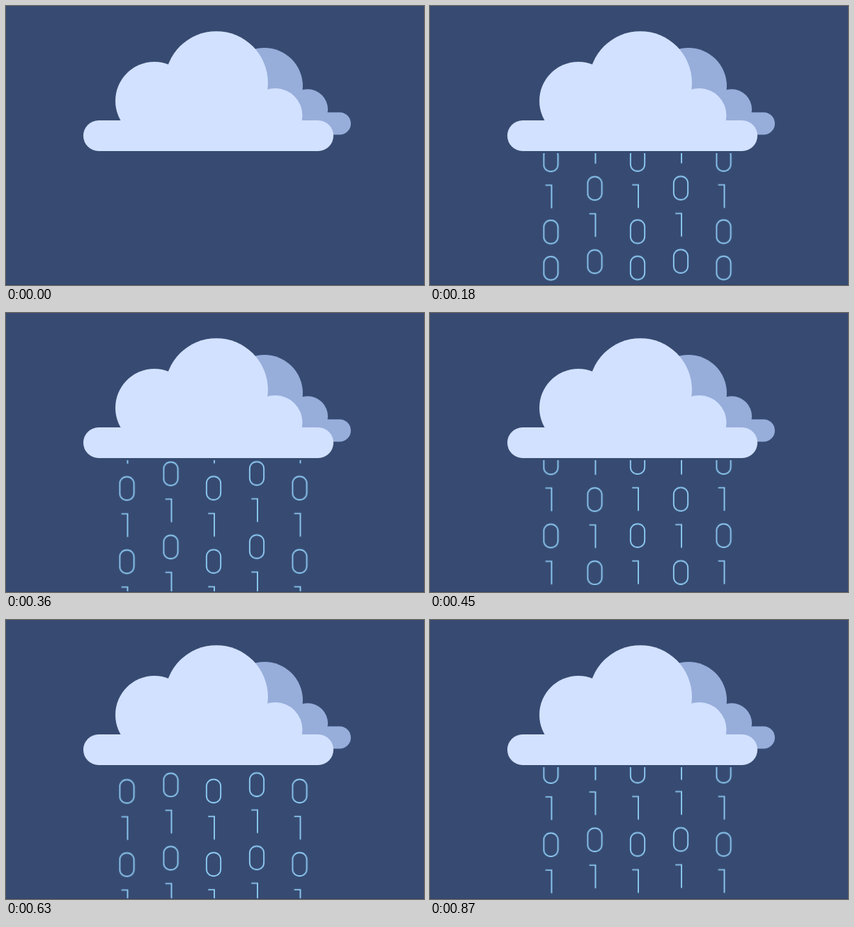
These frames come from a looping animation (600 px wide and 400 px high, 900 ms). An HTML page:

```html
<!DOCTYPE html>
<html lang="en">
<head>
<meta charset="utf-8">
<title>Data cloud</title>
<style>
  html, body { margin: 0; width: 100%; height: 100%; overflow: hidden; background: #374b72; }
  svg { display: block; }
  .back { fill: #97aedb; }
  .front { fill: #d2e1ff; }
  .rain { fill: none; stroke: #8ecaf3; stroke-width: 1.9; }
</style>
</head>
<body>
<svg width="600" height="400" viewBox="0 0 600 400">
  <defs>
    <clipPath id="below"><rect y="211" width="600" height="189"/></clipPath>
  </defs>
  <rect width="600" height="400" fill="#374b72"/>
  <g class="back">
    <circle cx="371" cy="115" r="55"/>
    <circle cx="433" cy="148.3" r="29"/>
    <rect x="400" y="152.5" width="95" height="32" rx="16"/>
  </g>
  <g class="front">
    <circle cx="213" cy="136" r="56"/>
    <circle cx="302" cy="110.2" r="74"/>
    <circle cx="386.5" cy="157" r="39"/>
    <rect x="111" y="164" width="359" height="44" rx="22"/>
  </g>
  <g class="rain" id="rain" clip-path="url(#below)"></g>
  <rect y="399" width="600" height="1" fill="#304267"/>
</svg>
<script>
  const LOOP = 900, STEPS = 30, PITCH = 52.5, COUNT = 13;
  const rain = document.getElementById('rain');

  // Each string has 13 alternating digits; two copies meet at a seam at y = 0.
  const falling = { first: 0, seam: 52, tail: 51, from: 222.1, travel: 680.5 };
  const rising = { first: 1, seam: 50, tail: PITCH, from: 902.2, travel: -680 };
  const columns = [
    [173.5, 0, falling], [236.5, 0, rising], [298, -0.5, falling],
    [360, -0.5, rising], [421.5, -0.5, falling]
  ];

  function add(parent, tag, attrs) {
    const el = document.createElementNS('http://www.w3.org/2000/svg', tag);
    for (const key in attrs) el.setAttribute(key, attrs[key]);
    return parent.appendChild(el);
  }

  function drawDigit(parent, digit, y) {
    if (digit) add(parent, 'path', { d: `M-7.8 ${y + 1.6}H1V${y + 34.7}` });
    else add(parent, 'rect', { x: -10.2, y: y + 0.95, width: 20.4, height: 33.6, rx: 9.8 });
  }

  function play(el, frames, easing) {
    el.animate(frames, { duration: LOOP, iterations: Infinity, easing, delay: -1 });
  }

  for (const [x, dy, kind] of columns) {
    const column = add(rain, 'g', {});
    for (let i = 0; i < COUNT; i++) {
      const digit = (kind.first + i) % 2;
      const above = i ? -kind.seam - kind.tail - (i - 1) * PITCH : -kind.seam;
      drawDigit(column, digit, i * PITCH);
      drawDigit(column, digit, above);
    }
    const at = y => ({ transform: `translate(${x}px, ${y + dy}px)` });
    play(column, [at(kind.from), at(kind.from + kind.travel)], `steps(${STEPS})`);
  }

  // The rain is off for the first step of each loop.
  play(rain, [
    { opacity: 0, easing: 'step-end' },
    { opacity: 1, offset: 1 / STEPS },
    { opacity: 1 }
  ], 'linear');
</script>
</body>
</html>
```
